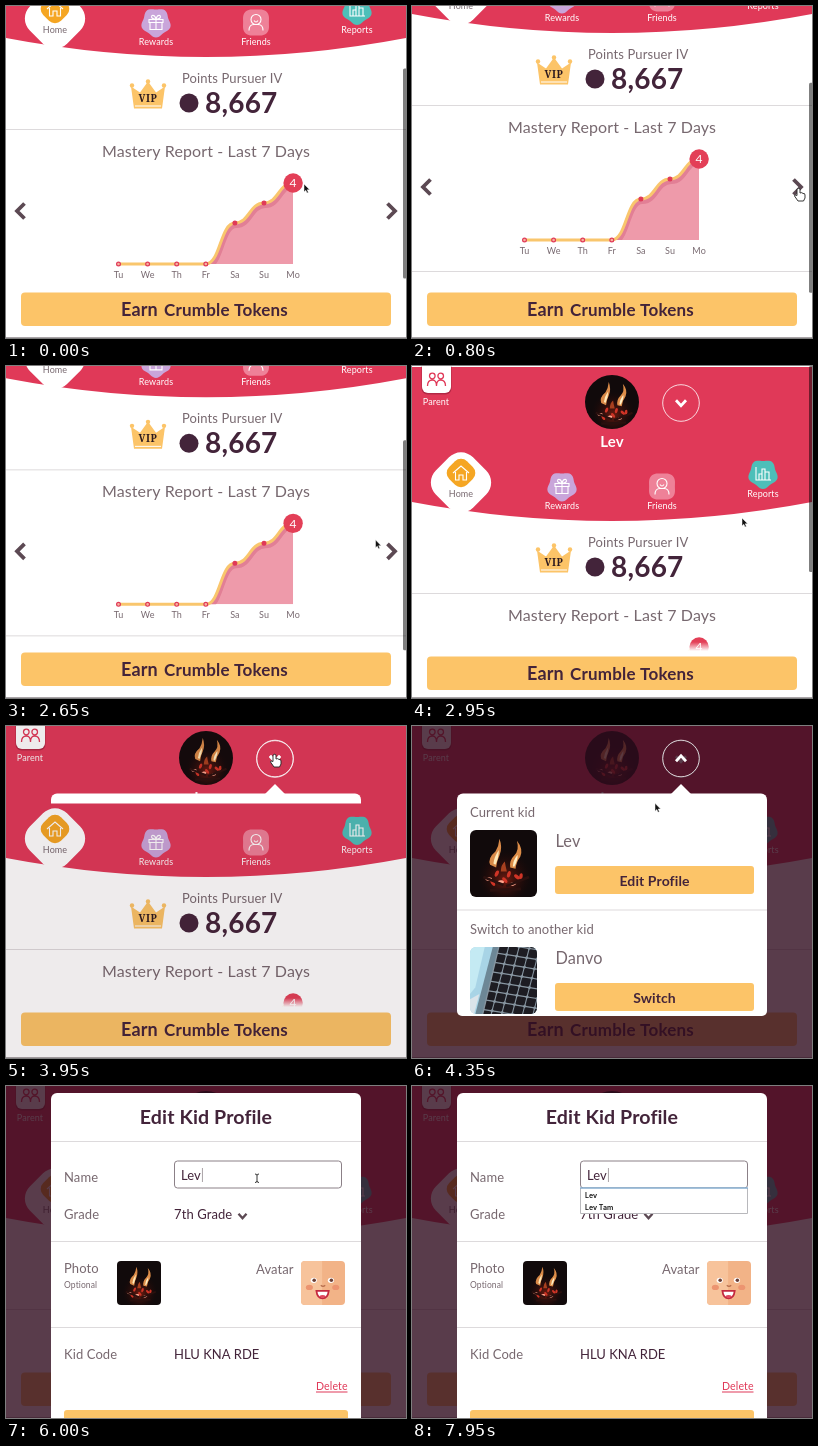
Recreate the animation shown at these times as an HTML page with a canvas. Size 400x332 px, loop 8000 ms.

```html
<!DOCTYPE html>
<html lang="en">
<head>
<meta charset="utf-8">
<title>Kid dashboard</title>
<style>
html, body { margin: 0; width: 100%; height: 100%; overflow: hidden; background: #fff; }
canvas { display: block; width: 400px; height: 332px; }
</style>
</head>
<body>
<canvas id="stage"></canvas>
<script>
const W = 400, H = 332, LOOP = 8000, REST = 4;
const PINK = '#e03958', GOLD = '#fcc468', PLUM = '#43243a', GREY = '#77686f', LINE = '#dddadc';
const KID = 'Lev', BRAND = 'Crumble Tokens';
const canvas = document.getElementById('stage');
const dpr = window.devicePixelRatio || 1;
canvas.width = W * dpr;
canvas.height = H * dpr;
const c = canvas.getContext('2d');

// Timing helpers
const clamp = v => Math.max(0, Math.min(1, v));
const span = (t, a, b) => clamp((t - a) / (b - a));
const ease = u => u * u * (3 - 2 * u);
function track(keys, t) {
  let i = 0;
  while (i < keys.length - 2 && t >= keys[i + 1][0]) i++;
  const a = keys[i], b = keys[i + 1], u = ease(span(t, a[0], b[0]));
  return a.slice(1).map((v, k) => v + (b[k + 1] - v) * u);
}
// Scrolling above REST is a rubber-band stretch
const SCROLL = [[0, 104], [100, 104], [450, 128], [2620, 128], [2900, 0], [3100, 0], [3300, REST]];
const POINTER = [[0, 298, 178], [200, 300, 178], [750, 386, 183], [2500, 386, 183], [2920, 330, 152],
  [3050, 330, 152], [3600, 268, 29], [4080, 268, 29], [4340, 243, 77], [4650, 242, 151],
  [5150, 242, 151], [5700, 251, 92]];

// Drawing helpers
function text(s, x, y, size, color, { weight = 400, align = 'left', gap = 0.1, font = 'Lato, sans-serif' } = {}) {
  c.font = `${weight} ${size}px ${font}`;
  c.letterSpacing = gap + 'px';
  c.textAlign = align;
  c.fillStyle = color;
  c.fillText(s, x, y);
}
const bold = { weight: 700 }, mid = { align: 'center' }, boldMid = { weight: 700, align: 'center' };
const heading = { align: 'center', gap: 0.13 };
function box(x, y, w, h, r, fill, stroke, lw = 1) {
  c.beginPath();
  c.roundRect(x, y, w, h, r);
  paint(fill, stroke, lw);
}
function disc(x, y, r, fill, stroke, lw = 1) {
  c.beginPath();
  c.arc(x, y, r, 0, 7);
  paint(fill, stroke, lw);
}
function oval(x, y, rx, ry, fill, turn = 0) {
  c.beginPath();
  c.ellipse(x, y, rx, ry, turn, 0, 7);
  paint(fill);
}
function shape(d, fill, stroke, lw = 1) {
  const p = new Path2D(d);
  if (fill) { c.fillStyle = fill; c.fill(p); }
  if (stroke) { c.strokeStyle = stroke; c.lineWidth = lw; c.stroke(p); }
}
function paint(fill, stroke, lw) {
  if (fill) { c.fillStyle = fill; c.fill(); }
  if (stroke) { c.strokeStyle = stroke; c.lineWidth = lw; c.stroke(); }
}
function rect(x, y, w, h, fill) {
  c.fillStyle = fill;
  c.fillRect(x, y, w, h);
}
function at(x, y, draw, scale = 1) {
  c.save();
  c.translate(x, y);
  c.scale(scale, scale);
  draw();
  c.restore();
}
function diamond(x, y, half, r, fill) {
  at(x, y, () => {
    c.rotate(Math.PI / 4);
    box(-half, -half, half * 2, half * 2, r, fill);
  });
}
function clipped(x, y, size, r, draw) {
  at(x, y, () => {
    c.beginPath();
    c.roundRect(0, 0, 100, 100, r * 100 / size);
    c.clip();
    draw();
  }, size / 100);
}
function button(label, x, y, w, h) {
  box(x, y, w, h, 3, GOLD);
  text(label, x + w / 2, y + h / 2 + 5.5, 14, PLUM, boldMid);
}

// Pictures on a 100 x 100 area
function fire() {
  rect(0, 0, 100, 100, '#110a0b');
  const glow = c.createRadialGradient(52, 74, 4, 52, 70, 40);
  glow.addColorStop(0, 'rgba(150,35,18,.6)');
  glow.addColorStop(1, 'rgba(40,8,6,0)');
  rect(0, 0, 100, 100, glow);
  shape('M30 52Q26 42 38 32Q43 24 44 13Q49 26 44 38Q40 46 39 56Z', '#d98a48');
  shape('M35 50Q36 40 43 30Q43 42 38 52Z', '#ffe9b8');
  shape('M60 56Q58 46 66 38Q74 30 70 16Q80 28 75 40Q69 48 68 58Z', '#dd8d48');
  shape('M64 54Q64 46 71 37Q72 44 66 55Z', '#fff0c8');
  shape('M46 62Q46 52 52 47Q53 54 55 62Z', '#a8401f');
  for (let i = 0; i < 9; i++) {
    oval(28 + i * 6, 73 + 8 * Math.sin(i * 2.3), 5, 2.6, i % 3 ? '#cf3426' : '#ffa48c', i);
  }
  shape('M20 70L50 82M54 84L88 70M30 90L76 88', null, '#2a100e', 4);
}
function laptop() {
  rect(0, 0, 100, 100, '#a8d4e6');
  shape('M0 0H22L8 60L0 70Z', '#c4eaf3');
  shape('M34 0H44L22 100H8Z', '#6d8796');
  shape('M0 78L14 70L6 100H0Z', '#dbe4ea');
  shape('M42 0H100V100H18Z', '#8795a0');
  c.save();
  c.beginPath();
  c.moveTo(44, 0);
  c.lineTo(100, 0);
  c.lineTo(100, 100);
  c.lineTo(20, 100);
  c.clip();
  c.transform(1, 0.16, -0.26, 1, 46, -12);
  for (let row = 0; row < 9; row++) {
    for (let col = 0; col < 6; col++) box(col * 15, row * 14 - 6, 13.4, 12.2, 2, '#1d1c22');
  }
  c.restore();
}
function smiley() {
  rect(0, 0, 100, 100, '#f2b387');
  rect(0, 0, 48, 100, '#f7c39b');
  for (const x of [29, 68]) {
    oval(x, 44, 7, 6, '#fff');
    disc(x + 1, 44, 4, '#6b3f36');
    oval(x + (x < 50 ? -10 : 11), 60, 8, 6, '#ec9470');
  }
  shape('M45 55Q50 60 55 55', null, '#b9704e', 3);
  shape('M35 68H63Q61 85 49 85Q37 85 35 68Z', '#fff', '#c4293f', 4);
  shape('M41 80Q49 74 57 80Q53 84 49 84Q45 84 41 80Z', '#e0485c');
}

// Header icons
function blossom(x, y, color, petals) {
  c.beginPath();
  for (let i = 0; i <= 60; i++) {
    const a = i / 60 * Math.PI * 2, r = 14 + 1.1 * Math.cos(petals * (a + Math.PI / petals + Math.PI / 2));
    c.lineTo(x + r * Math.cos(a), y + r * Math.sin(a));
  }
  paint(color);
}
const ICONS = {
  Home: 'M-8 0L0 -7L8 0M-5.5 -1V7H-2V2H2V7H5.5V-1',
  Rewards: 'M-7 -3H7V0H-7ZM-6 0V7H6V0M0 -3V7M0 -3Q-6 -4 -4 -7Q-1 -8 0 -3Q1 -8 4 -7Q6 -4 0 -3',
  Friends: 'M-7 8Q-7 2 -2 2H2Q7 2 7 8M-5 -3A5 5 0 1 0 5 -3A5 5 0 1 0 -5 -3M-2 -2Q0 1 2 -2',
  Reports: 'M-7 -7V6H8M-4 6V0H-1V6M-1 6V-5H2V6M2 6V-2H6V6'
};
function tab(name, x, y, labelY, color, petals) {
  if (petals) {
    blossom(x, y, color, petals);
  } else {
    diamond(x, y + 9.5, 26.3, 17, '#fff');
    diamond(x, y, 12.6, 8.5, color);
  }
  at(x, y, () => shape(ICONS[name], null, '#fff', 1.1));
  text(name, x, labelY, 9, petals ? '#fff' : GREY, mid);
}
function chevron(x, y, w, h, color, lw) {
  c.beginPath();
  c.moveTo(x - w, y - h);
  c.lineTo(x, y + h);
  c.lineTo(x + w, y - h);
  paint(null, color, lw);
}
function menuButton(y, open) {
  disc(269, y, 18.3, null, 'rgba(255,255,255,.8)');
  chevron(269, y, 5, open ? -2.7 : 2.7, '#fff', 2.8);
}
function header() {
  shape('M0 1H400V136Q200 174 0 136Z', PINK);
  box(9.5, -7, 30, 35.5, 6, 'rgba(70,0,25,.3)');
  box(10, -8, 29, 35, 6, '#fff');
  at(24.5, 14, () => shape('M-9 6Q-9 0 -4 0Q0 0 0 6M0 6Q0 0 4 0Q9 0 9 6M-7 -4A2.8 2.8 0 1 0 -1.4 -4A2.8 2.8 0 1 0 -7 -4M1.4 -4A2.8 2.8 0 1 0 7 -4A2.8 2.8 0 1 0 1.4 -4',
    null, PINK, 1.3));
  text('Parent', 24, 39, 9, '#fff', mid);
  clipped(173, 9, 54, 27, fire);
  menuButton(37, false);
  text(KID, 200, 80.5, 15, '#fff', boldMid);
  tab('Home', 49, 107, 130.5, '#f5a623', 0);
  tab('Rewards', 150, 120.5, 143, '#c9a5da', 5);
  tab('Friends', 250, 120.5, 143, '#ee8198', 4);
  tab('Reports', 351, 108, 130.5, '#4dbfb9', 5);
}

// Page content
function points() {
  at(142, 176.5, () => {
    shape('M-17 8L-8 14L0 3L8 14L17 8L14 30H-14Z', GOLD);
    for (const [x, y] of [[-16, 7], [0, 3], [16, 7]]) disc(x, y, 2.2, GOLD);
    shape('M-13 27.5H13', null, '#fff', 1);
    text('VIP', 0, 23, 10, '#2c1a20', { weight: 900, align: 'center', gap: 0.6, font: '"Noto Serif", serif' });
  });
  text('Points Pursuer IV', 176, 181, 13, GREY);
  disc(183, 201, 9.5, PLUM);
  text('8,667', 199, 211, 28, PLUM, { weight: 700, gap: 0.2 });
}
const DAYS = ['Tu', 'We', 'Th', 'Fr', 'Sa', 'Su', 'Mo'];
const LEVELS = [362, 362, 362, 362, 321, 301, 281];
const dayX = i => 112.5 + i * 29.1;
function curve(from, dx = 0, dy = 0) {
  c.beginPath();
  c.moveTo(dayX(from) + dx, LEVELS[from] + dy);
  for (let i = from + 1; i < 7; i++) {
    const a = dayX(i - 1) + dx, b = dayX(i) + dx, m = (a + b) / 2;
    c.bezierCurveTo(m, LEVELS[i - 1] + dy, m, LEVELS[i] + dy, b, LEVELS[i] + dy);
  }
}
function mastery() {
  text('Mastery Report - Last 7 Days', 200, 255, 16, GREY, heading);
  c.save();
  c.beginPath();
  c.rect(0, 260, dayX(6), 102);
  c.clip();
  curve(3);
  c.lineTo(dayX(6), 362);
  c.closePath();
  paint('#ee9aaa');
  curve(3, 1.5, 3);
  paint(null, '#e27f95', 4);
  c.restore();
  curve(0);
  paint(null, '#f9c66d', 3);
  DAYS.forEach((d, i) => {
    if (i < 6) disc(dayX(i), LEVELS[i], 1.9, i < 4 ? '#f7b3a0' : PINK, PINK, 1.2);
    text(d, dayX(i), 375.5, 9, GREY, mid);
  });
  disc(dayX(6), 281, 9.7, '#e33f57');
  text('4', dayX(6), 285.3, 12, '#fff', mid);
}
const HATS = [
  () => { oval(0, -7, 15, 3.5, '#7b4a35'); shape('M-8 -7Q-8 -15 -3 -13Q0 -11 3 -13Q8 -15 8 -7Z', '#8c5840'); },
  () => { shape('M-16 -8Q-10 -16 0 -15Q10 -16 16 -8Q0 -3 -16 -8Z', '#33212a'); shape('M-12 -6Q0 -2 12 -6', null, '#c8363f', 3); disc(4, -1, 3, '#33212a'); },
  () => { shape('M-12 -3Q-12 -15 0 -15Q12 -15 12 -3Z', '#b08d5a'); oval(0, -4, 14, 2.5, '#97774a'); },
  () => { shape('M-13 6Q-15 -14 0 -14Q15 -14 13 6L9 0Q8 -5 0 -5Q-8 -5 -9 0Z', '#3d4353'); shape('M-11 6H11M-9 9H9', null, '#5b6375', 1.6); }
];
const BADGES = [[110, 302, '#ef7f92', 4], [156.5, 270, '#f4a877', 1], [203, 270, '#58bfc2', 3], [249.5, 302, '#f6bd45', 2]];
function badges() {
  text('Latest Badges', 200, 255, 16, GREY, heading);
  BADGES.forEach(([x, y, skin, stars], i) => {
    box(x + 0.5, y + 0.5, 40, 40, 3, '#fff', i < 3 ? '#bda4d3' : '#a69db3', 1.4);
    at(x + 20.5, y + 18, () => {
      disc(0, 0, 12.5, skin);
      for (const ex of [-4, 4]) {
        disc(ex, -1, 2, '#fff');
        disc(ex, -1, 1, '#3a2530');
      }
      shape('M-5 5Q0 9 5 5', null, '#5c2a35', 1.3);
      HATS[i]();
    });
    for (let k = 0; k < 4; k++) {
      text(k < stars ? '★' : '☆', x + 11.5 + k * 6, y + 38, 6.5, '#a890bd', { align: 'center', gap: 0, font: '"DejaVu Sans", sans-serif' });
    }
  });
}
function carousel(t) {
  const turn = ease(span(t, 900, 1300)) + ease(span(t, 2080, 2480));
  c.save();
  c.beginPath();
  c.rect(29, 230, 342, 162);
  c.clip();
  for (let i = 0; i < 3; i++) {
    const dx = (i - turn) * W;
    if (Math.abs(dx) < W) at(dx, 0, i === 1 ? badges : mastery);
  }
  c.restore();
  at(14, 309, () => shape('M4.5 -7.5L-3 0L4.5 7.5', null, '#5c4953', 3.8));
  at(386, 309, () => shape('M-4.5 -7.5L3 0L-4.5 7.5', null, '#5c4953', 3.8));
}
function footer(stretch) {
  at(0, stretch, () => {
    const fade = c.createLinearGradient(0, 272, 0, 281);
    fade.addColorStop(0, 'rgba(255,255,255,0)');
    fade.addColorStop(1, '#fff');
    rect(0, 272, W, 60, fade);
    box(15, 286.5, 370, 33.5, 4, GOLD);
    text('Earn', 115, 309.5, 18, PLUM, bold);
    text(BRAND, 158, 309.5, 17, PLUM, { weight: 700, gap: 0.2 });
  });
  rect(0, 331, W, 1, '#a9a4a7');
}
function page(t) {
  const [scroll] = track(SCROLL, t);
  const stretch = Math.max(0, REST - scroll);
  rect(0, 0, W, H, '#fff');
  at(0, -scroll, () => {
    header();
    points();
    rect(0, 227, W, 1, LINE);
    carousel(t);
    rect(0, 393, W, 1, LINE);
  });
  footer(stretch);
  const alpha = 0.5 * (1 - span(t, 3450, 3650));
  box(397, scroll * 0.6, 4, 210 - stretch, 1.5, `rgba(0,0,0,${alpha})`);
}

// Layers over the page
function kidRow(title, name, action, picture, y) {
  text(title, 58, y, 13, GREY);
  clipped(58, y + 13, 67, 6, picture);
  text(name, 143.5, y + 30, 16.3, GREY);
  button(action, 143, y + 49, 199, 28);
}
function kidMenu(open) {
  menuButton(32.5, open > 0.5);
  shape('M259 68L269 58L279 68Z', '#fff');
  c.save();
  c.beginPath();
  c.roundRect(45, 67.5, 310, 222.5 * open, [6, 6, 5 * open, 5 * open]);
  c.clip();
  rect(45, 67, 310, 223, '#fff');
  kidRow('Current kid', KID, 'Edit Profile', fire, 91);
  rect(45, 183.5, 310, 1, LINE);
  kidRow('Switch to another kid', 'Danvo', 'Switch', laptop, 208);
  c.restore();
}
function profile(t) {
  box(45, 7, 310, 340, 6, '#fff');
  text('Edit Kid Profile', 200, 38, 19.6, PLUM, boldMid);
  for (const y of [55, 155, 241]) rect(45, y, 310, 1, LINE);
  text('Name', 58, 96, 13, GREY);
  box(168.5, 75, 167, 27, 3, '#fff', '#8b8087');
  text(KID, 175, 93.5, 13, PLUM);
  const caretX = 176 + c.measureText(KID).width;
  if (t >= 5900 && (t - 5900) % 1000 < 500) rect(caretX, 82, 1, 14, '#aaa3a7');
  text('Grade', 58, 133, 13, GREY);
  text('7th Grade', 168, 133, 13, PLUM);
  chevron(236.5, 130, 4, 2.2, '#5c4953', 2.4);
  text('Photo', 58, 187, 13, GREY);
  text('Optional', 58, 202, 8.5, GREY);
  clipped(111, 175, 44, 4, fire);
  text('Avatar', 250, 188, 13, GREY);
  clipped(295, 175, 44, 4, smiley);
  text('Kid Code', 58, 273, 13, GREY);
  text('HLU KNA RDE', 168, 273, 13, PLUM, { gap: 0 });
  text('Delete', 310, 304, 10.6, PINK);
  rect(310, 305.5, 31.5, 1, PINK);
  box(58, 324, 284, 30, 3, GOLD);
  if (t >= 7150) {
    box(168.5, 102, 167, 25.5, 0, '#fff', '#b8b8bc');
    rect(168, 101.5, 168, 1, '#6fa9dc');
    const item = { weight: 600, gap: 0, font: 'Inter, sans-serif' };
    text(KID, 173, 112, 7, '#111', item);
    text(KID + ' Tam', 173, 124, 7, '#111', item);
  }
}

function pointer(t) {
  if (t >= 7000) return;
  const [x, y] = track(POINTER, t);
  const hand = (t > 720 && t < 2560) || (t > 3530 && t < 4130) || (t > 4600 && t < 5220);
  at(x, y, () => {
    c.lineJoin = 'round';
    if (hand) {
      shape('M-1 0Q1 -1.5 2 0V4Q4 3 5 4.5Q7 4 7 6V9L5.5 12H0L-3.5 7Q-3.5 5 -1 6.5Z', '#fff', '#222', 0.9);
    } else if (t > 5560) {
      shape('M-2 -4Q0 -4 0 -2.5Q0 -4 2 -4M0 -2.5V3M-2 4.5Q0 4.5 0 3Q0 4.5 2 4.5', null, '#333', 1);
    } else {
      shape('M0 0V8L1.8 6.3L3 9L4.4 8.4L3.2 5.8H5.7Z', '#111', '#fff', 0.5);
    }
  });
}

function draw(t) {
  c.setTransform(dpr, 0, 0, dpr, 0, 0);
  page(t);
  const shade = span(t, 3910, 4300);
  if (shade > 0) rect(0, 0, W, H, `rgba(48,12,30,${0.8 * shade})`);
  const open = ease(span(t, 3900, 4300));
  const edit = ease(span(t, 4800, 5050));
  if (open > 0 && edit < 1) kidMenu(open);
  if (edit > 0) {
    c.globalAlpha = edit;
    at(0, -24 * (1 - edit), () => profile(t));
    c.globalAlpha = 1;
  }
  pointer(t);
}

const start = performance.now();
function tick() {
  draw((performance.now() - start) % LOOP);
  requestAnimationFrame(tick);
}
tick();
</script>
</body>
</html>
```
